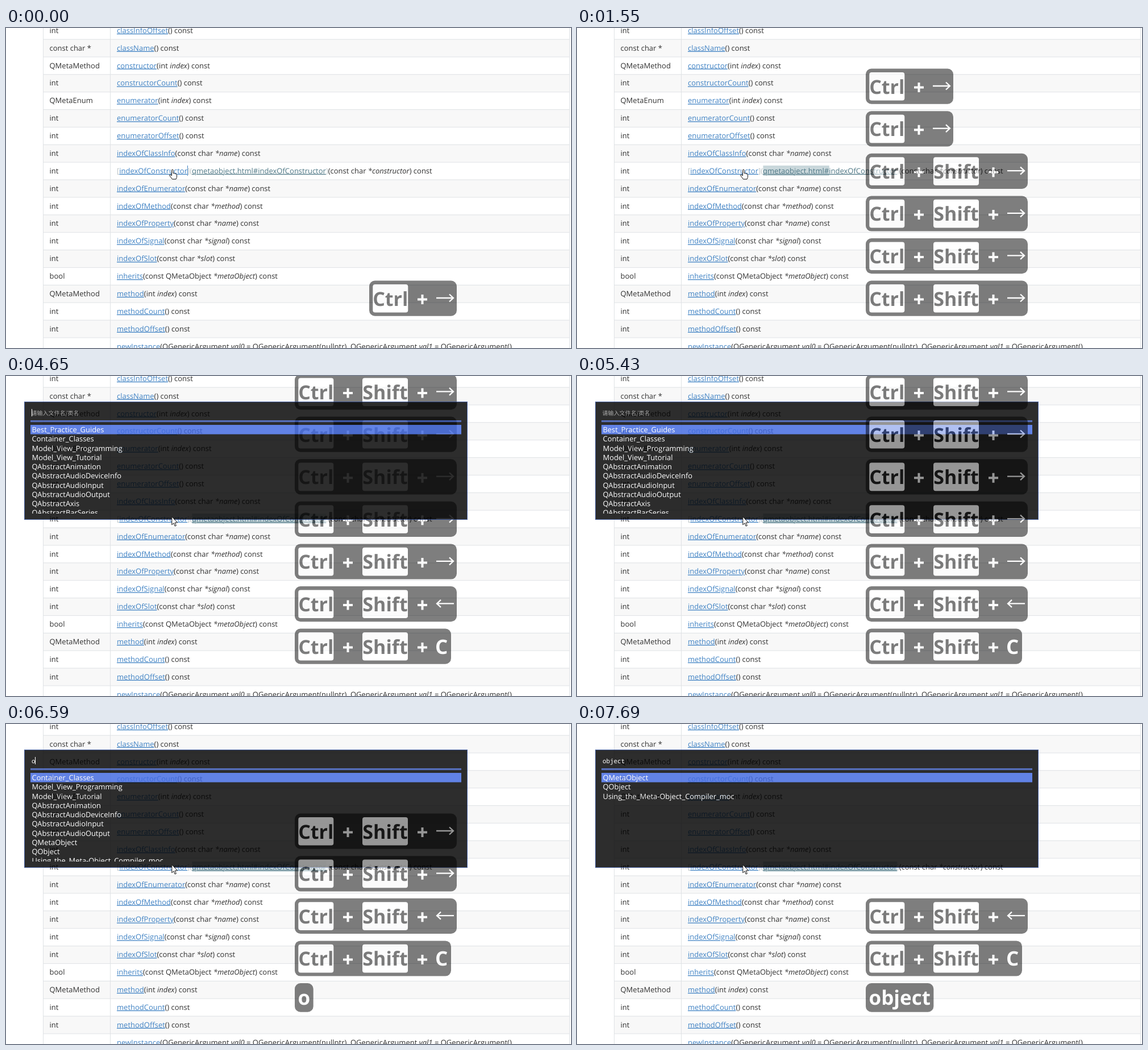
Write an HTML page that moves like this. It is 994 by 563 pixels and loops after 8 s.

```html
<!DOCTYPE html>
<html lang="en">
<head>
<meta charset="utf-8">
<title>Search by class name</title>
<style>
  html, body { margin: 0; width: 100%; height: 100%; overflow: hidden; background: #fff; }
  svg { display: block; width: 994px; height: 563px; }
  text { white-space: pre; text-rendering: geometricPrecision; }
  .page { font: 13px "Open Sans", sans-serif; fill: #333; }
  .link { fill: #4183c4; text-decoration: underline; }
  .url { fill: #4f7886; text-decoration: underline; }
  .mark { fill: #bcc4c6; }
  .arg { font-style: italic; }
  .item { font: 12.9px "Open Sans", sans-serif; fill: #fff; }
  .hint { font: 10px "Noto Sans CJK SC", "Noto Sans CJK", sans-serif; fill: #999; }
  .typed { font: 10.83px "Noto Sans Mono", monospace; fill: #fff; }
  .key { font: bold 34px "Open Sans", sans-serif; text-anchor: middle; }
  .word { font: bold 35px "Open Sans", sans-serif; fill: #fff; }
  .line { fill: none; stroke: #fff; }
</style>
</head>
<body>
<svg id="stage" viewBox="0 0 994 563"></svg>
<script>
const LOOP = 8000, DIALOG = 4650, RAISED = 4730;
const PITCH = 30.875, FIRST_CENTRE = 4.1;
const BLUE = '#4169e1';

// type | linked name | rest, with _italic_ arguments
const rows = `int|classInfoOffset|() const
const char *|className|() const
QMetaMethod|constructor|(int _index_) const
int|constructorCount|() const
QMetaEnum|enumerator|(int _index_) const
int|enumeratorCount|() const
int|enumeratorOffset|() const
int|indexOfClassInfo|(const char _*name_) const
int|indexOfConstructor|(const char _*constructor_) const
int|indexOfEnumerator|(const char _*name_) const
int|indexOfMethod|(const char _*method_) const
int|indexOfProperty|(const char _*name_) const
int|indexOfSignal|(const char _*signal_) const
int|indexOfSlot|(const char _*slot_) const
bool|inherits|(const QMetaObject _*metaObject_) const
QMetaMethod|method|(int _index_) const
int|methodCount|() const
int|methodOffset|() const
|newInstance|(QGenericArgument _val0_ = QGenericArgument(nullptr), QGenericArgument _val1_ = QGenericArgument()`
  .split('\n').map(row => row.split('|'));
const EDITED = 8;

const files = `Best_Practice_Guides Container_Classes Model_View_Programming Model_View_Tutorial
QAbstractAnimation QAbstractAudioDeviceInfo QAbstractAudioInput QAbstractAudioOutput QAbstractAxis
QAbstractBarSeries QMetaObject QObject Using_the_Meta-Object_Compiler_moc`.split(/\s+/);

// [time, value] steps
const selectionEnd = [[0, 0], [770, 404], [1000, 407.4], [1150, 435.3], [1550, 443.8],
  [1850, 563.4], [2100, 567.2], [3180, 563.4]];
const typedCount = [[0, 0], [6510, 1], [6670, 2], [6740, 3], [6820, 4], [6900, 5], [7060, 6]];
const echoCount = [[0, 0], [6590, 1], [6740, 2], [6820, 3], [6900, 4], [6980, 5], [7140, 6]];
const caretOn = [[0, 1], [5430, 0], [5980, 1], [7690, 0]];
const WORD = 'object';

// key presses: birth, shift held, last key, end
const presses = [
  [0, false, '→', 5300], [310, false, '→', 5390], [770, true, '→', 5830],
  [1000, true, '→', 6060], [1150, true, '→', 6280], [1550, true, '→', 6590],
  [1850, true, '→', 6980], [2100, true, '→', 7140], [3180, true, '←', 9000], [4650, true, 'C', 9000]
];

const stage = document.getElementById('stage');
const pen = document.createElement('canvas').getContext('2d');
const at = (steps, t) => steps.reduce((value, [time, next]) => t >= time ? next : value, 0);
const rect = (x, y, w, h, fill, more = '') =>
  `<rect x="${x}" y="${y}" width="${w}" height="${h}" fill="${fill}" ${more}/>`;
const text = (x, y, style, body) => `<text x="${x}" y="${y}" class="${style}">${body}</text>`;
const span = (style, body) => `<tspan class="${style}">${body}</tspan>`;
const path = (d, width) => `<path class="line" d="${d}" stroke-width="${width}"/>`;

function page(t) {
  let shapes = '', words = '';
  rows.forEach(([type, name, rest], i) => {
    const centre = FIRST_CENTRE + PITCH * i, top = centre - PITCH / 2;
    if (i % 2) shapes += rect(65, top, 927, PITCH, '#f8f8f8');
    shapes += rect(65, top, 927, 1, '#dfe2e5');
    const link = span('link', name);
    const head = i === EDITED
      ? span('mark', '[') + link + span('mark', '](') +
        span('url', `qmetaobject.html#${name}`) + span('mark', ')')
      : link;
    const y = centre + 4.7;
    words += text(76.5, y, 'page', type) +
      text(195, y, 'page', head + rest.replace(/_(.*?)_/g, span('arg', '$1')));
  });
  for (const x of [65, 183, 991]) shapes += rect(x, 0, 1, 563, '#dfe2e5');
  const end = at(selectionEnd, t);
  shapes += end ? rect(327.4, 242, end - 327.4, 18, '#c9d7db')
                : rect(t < 310 ? 319 : 327, 242, 1, 18, '#4183c4');
  return shapes + words;
}

function keyBadge(shift, last) {
  const cap = (x, w, label) =>
    rect(x, 6.4, w, 49.6, '#fff', 'rx="4"') + text(x + w / 2, 44, 'key', label);
  const plus = x => path(`M${x - 8.5} 33h17m-8.5-8.5v17`, 4);
  const x = shift ? 249 : 118;
  const tail = {
    '→': path(`M${x} 30.4h30m-7-6.5l7 6.5l-7 6.5`, 2.3),
    '←': path(`M${x + 31} 30.4h-30m7-6.5l-7 6.5l7 6.5`, 2.3),
    'C': text(x - 2, 44, 'word', 'C')
  }[last];
  const width = x + (last === 'C' ? 26 : 36);
  return {
    width, height: 62.2,
    body: cap(6.3, 62, 'Ctrl') + plus(93.5) + (shift ? cap(119, 80, 'Shift') + plus(224.5) : '') + tail
  };
}

function wordBadge(word) {
  pen.font = 'bold 35px "Open Sans", sans-serif';
  return { width: pen.measureText(word).width + 11, height: 50.8, body: text(5.5, 38, 'word', word) };
}

function badges(t) {
  const stack = presses.filter(([birth, , , end]) => t >= birth && t < end)
    .map(([, shift, last, end]) => ({ ...keyBadge(shift, last), fade: t >= end - 80 ? 0.25 : 1 }));
  const echo = at(echoCount, t);
  if (echo) stack.push({ ...wordBadge(WORD.slice(0, echo)), fade: 1 });
  const left = 793 - Math.max(...stack.map(badge => badge.width));
  let bottom = 506.8;
  return stack.reverse().map(({ width, height, body, fade }) => {
    const top = bottom - height;
    bottom = top - 12.4;
    return `<g transform="translate(${left} ${top})" opacity="${0.5 * fade}">` +
      rect(0, 0, width, height, '#000', 'rx="10"') + body + '</g>';
  }).join('');
}

function dialog(t) {
  const count = at(typedCount, t), word = WORD.slice(0, count);
  const found = files.filter(name => name.toLowerCase().includes(word)).slice(0, 10);
  return '<g opacity=".82">' + rect(32.5, 45.5, 779, 207, '#000', 'stroke="#274694"') +
    (count ? text(45, 69, 'typed', word) : text(44.5, 69, 'hint', '请输入文件名/类名')) +
    (at(caretOn, t) ? rect(Math.floor(45 + 6.5 * count), 58, 1, 13, '#fff') : '') +
    rect(43, 78, 758, 3, '#1c2f66') + rect(43, 78, 758, 1, BLUE) + rect(43, 80, 758, 1, BLUE) +
    rect(43, 86, 758, 16.5, BLUE) +
    '<clipPath id="list"><path d="M43 82h758v160H43z"/></clipPath><g clip-path="url(#list)">' +
    found.map((name, i) => text(45.5, 99 + 16.27 * i, 'item', name)).join('') + '</g></g>';
}

function pointer(t) {
  const d = t < DIALOG
    ? 'M291.5 260V250.5q0-1.5 1.3-1.5t1.3 1.5v5q2.4-.8 2.6.8 2-.5 2.2.8 1.6-.2 1.6 1.4v4l-1.5 3.5h-6.5l-4.5-6q-.8-1.8.8-2 1.2 0 2.7 2z'
    : 'M291.8 247.5v14.3l3.2-3 2.2 5.4 2.2-1-2.3-5.2h4.5z';
  return `<path d="${d}" fill="#fff" stroke="#111" stroke-width="1"/>`;
}

let shown = '';
function draw() {
  const t = performance.now() % LOOP;
  const popup = t >= DIALOG ? dialog(t) : '';
  const layers = t >= RAISED ? popup + badges(t) : badges(t) + popup;
  const picture = page(t) + layers + pointer(t);
  if (picture !== shown) stage.innerHTML = shown = picture;
  requestAnimationFrame(draw);
}
draw();
</script>
</body>
</html>
```
